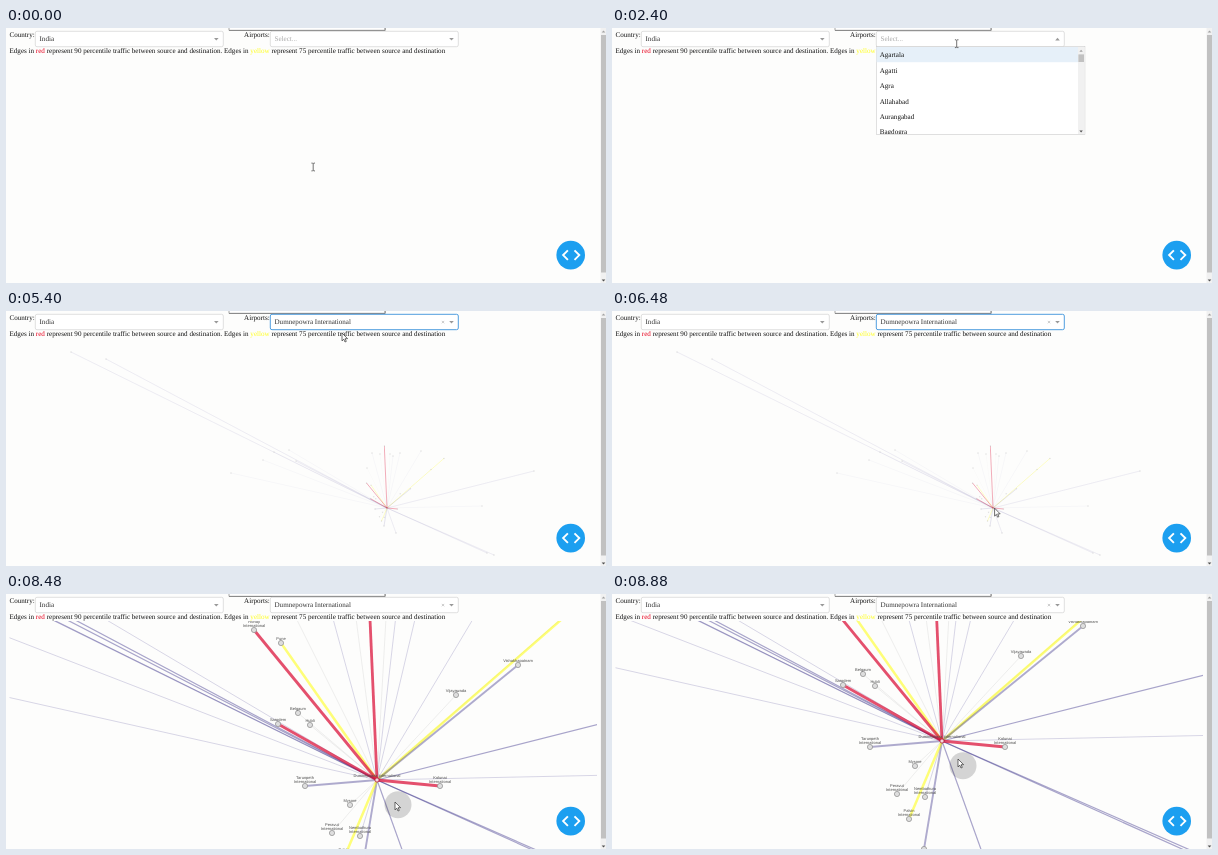
Animation of 600 by 255 pixels, one loop 9000 ms. Source, as an HTML page:

```html
<!DOCTYPE html>
<html lang="en">
<head>
<meta charset="utf-8">
<title>Airport traffic</title>
<style>
html, body { margin: 0; width: 100%; height: 100%; overflow: hidden; background: #fdfdfc; }
svg { display: block; width: 600px; height: 255px; }
text { font: 7.09px "Liberation Serif", "Times New Roman", serif; fill: #111; text-rendering: geometricPrecision; white-space: pre; }
#graph text { font: 4px "Liberation Sans", Arial, sans-serif; fill: #4a4a4a; text-anchor: middle; }
</style>
</head>
<body>
<svg id="stage" viewBox="0 0 600 255">
  <defs><clipPath id="view"><rect x="3.5" y="27" width="587.5" height="228"/></clipPath>
  <clipPath id="list"><rect x="264" y="18.5" width="209" height="87.6"/></clipPath></defs>
  <g clip-path="url(#view)"><g id="graph"><g id="edges"></g><g id="labels"></g></g><circle id="press" r="13.5" fill="#000" opacity=".16"/></g>

  <path d="M223 0V2.4H379V0" fill="#fff" stroke="#a5a5a5"/>
  <path d="M223 2.4H379.2V0" fill="none" stroke="#777" stroke-width=".7"/>
  <text x="3.5" y="9.3">Country:</text>
  <text x="238.1" y="9.4">Airports:</text>
  <text x="3.5" y="25.2">Edges in <tspan fill="#e8001c">red</tspan> represent 90 percentile traffic between source and destination. Edges in <tspan fill="#ffff1a">yellow</tspan> represent 75 percentile traffic between source and destination</text>

  <rect x="29.3" y="3.3" width="188" height="15.4" rx="1.7" fill="#fff" stroke="#ccc" stroke-width=".6"/>
  <text x="33.5" y="13.4" style="fill:#333">India</text>
  <path d="M208 9.9h4.6l-2.3 2.6z" fill="#999"/>

  <rect id="box" x="264.3" y="3.3" width="188" height="15.4" rx="1.7" fill="#fff"/>
  <text id="value" x="268.5" y="13.4"></text>
  <rect id="caret" y="7.4" width=".6" height="7.4" fill="#222"/>
  <path id="clear" d="M435.8 9.9l2.4 2.4m0-2.4l-2.4 2.4" stroke="#aaa" stroke-width=".6"/>
  <path id="arrow" fill="#999"/>
  <g id="menu">
    <rect id="menuBox" x="264.3" y="18.6" width="208.6" fill="#fff" stroke="#ccc" stroke-width=".6"/>
    <rect id="hover" x="264.6" y="19" height="15.2" fill="#e6f0f9"/>
    <g id="options" clip-path="url(#list)"></g>
    <g id="menuBar">
      <rect x="466" y="19" width="6.5" height="87" fill="#f1f1f1"/>
      <rect x="466.4" y="26.4" width="5.6" height="7.6" fill="#c1c1c1"/>
      <path d="M467.4 23.8h3.4l-1.7-2z" fill="#a3a3a3"/>
      <path d="M467.4 102.6h3.4l-1.7 2z" fill="#505050"/>
    </g>
  </g>

  <rect x="594.5" width="5.5" height="255" fill="#f1f1f1"/>
  <rect x="595" y="7" width="5" height="237.5" fill="#c1c1c1"/>
  <path d="M595.7 4.6h3.6l-1.8-2z" fill="#a3a3a3"/>
  <path d="M595.7 251.4h3.6l-1.8 2z" fill="#505050"/>
  <circle cx="564.7" cy="227.1" r="14.3" fill="#1c9ff0"/>
  <path d="M561.9 222.3l-4.8 4.8 4.8 4.8M568.5 222.3l4.8 4.8-4.8 4.8" fill="none" stroke="#fff" stroke-width="1.9"/>

  <g id="beam" fill="none" stroke="#444" stroke-width=".75"><path d="M-1.8-3.9H-.5L0-3.4.5-3.9H1.8M0-3.4V3.4M-1.8 3.9H-.5L0 3.4.5 3.9H1.8"/></g>
  <g id="hand"><path d="M0 0q.9 0 .9 1v2l2.3.6q.9.3.8 1.2L3.6 7.5H-.6L-2.6 4.4q.6-.7 1.7.4V1q0-1 .9-1z" fill="#fff" stroke="#222" stroke-width=".55"/></g>
  <g id="pointer"><path d="M0 0V7.9L1.8 6.2 3 9 4.3 8.4 3.1 5.7H5.6z" fill="#fff" stroke="#222" stroke-width=".65"/></g>
</svg>
<script>
const LOOP = 9000, HUB = 'Dumnepowra International';
const $ = id => document.getElementById(id);

function add(parent, tag, attrs, text) {
  const el = document.createElementNS('http://www.w3.org/2000/svg', tag);
  for (const k in attrs) el.setAttribute(k, attrs[k]);
  if (text) el.textContent = text;
  return parent.appendChild(el);
}
const show = (id, on) => $(id).setAttribute('display', on ? 'inline' : 'none');
const move = (id, x, y) => $(id).setAttribute('transform', `translate(${x} ${y})`);

// stroke, width, opacity
const STYLES = {
  red: ['#dc143c', 2.8, .74],
  yellow: ['#ffff00', 2.5, .52],
  thick: ['#2a2080', 1.9, .37],
  mid: ['#2a2080', 1.2, .4],
  thin: ['#2a2080', .7, .25],
  faint: ['#444444', .5, .17]
};
// offsets from the hub at full zoom
const NEAR = [
  [-67, -55, 'faint', 'Hubli'], [-79, -67, 'faint', 'Belgaum'],
  [-27, 25, 'faint', 'Mysore'], [-45, 53, 'faint', 'Peravut|International'],
  [79, -85, 'faint', 'Vijayawada'], [-17, 56, 'thin', 'Nembathura|International'],
  [-72, 6, 'thick', 'Tarunpeth|International'], [141, -115, 'thick', 'Vishakhapatnam'],
  [-96, -137, 'yellow', 'Pune'], [-33, 78, 'yellow', 'Palvin|International'],
  [-123, -150, 'red', 'Vikrantesh|Rohaji|International'],
  [-99, -56, 'red', 'Sarodem'], [63, 6, 'red', 'Kolunai|International']
];
// offsets from the hub before zooming
const FAR = [
  [-316, -156, 'mid'], [-281, -149, 'mid'], [-91, -47, 'mid'], [-113, -56, 'thin'],
  [-124, -48, 'thin'], [-156, -35, 'thin'], [-98, -58, 'thin'], [-20, -40, 'faint'],
  [-7, -54, 'faint'], [-15, -55, 'thin'], [3, -54, 'faint'], [6, -52, 'thin'],
  [13, -55, 'thin'], [34, -57, 'thin'], [44, -38.5, 'faint'], [57, -49.6, 'yellow'],
  [147, -37, 'mid'], [95, -2, 'thin'], [107, 47, 'mid'], [100, 45, 'mid'],
  [9, 25, 'mid'], [-3, 18, 'thick'], [-2.7, -62, 'red']
];

function buildGraph() {
  const g = $('edges');
  const nodes = FAR.map(([x, y, s]) => [x * 6, y * 6, s]).concat(NEAR);
  for (const [x2, y2, s] of nodes) {
    const [stroke, width, opacity] = STYLES[s];
    add(g, 'line', { x2, y2, stroke, 'stroke-width': width, opacity });
  }
  for (const [cx, cy, , name] of nodes) {
    add(g, 'circle', { cx, cy, r: 2.6, fill: '#dedede', stroke: '#8c8c8c', 'stroke-width': .7 });
    if (name) label(cx, cy, name.split('|'));
  }
  add(g, 'circle', { r: 2.1, fill: '#f4d6dc', stroke: '#b01335', 'stroke-width': .7 });
  label(0, 0, [HUB]);
}
function label(x, y, lines) {
  lines.forEach((s, i) => add($('labels'), 'text', { x, y: y - 3.1 - 4.2 * (lines.length - 1 - i) }, s));
}

const LISTS = {
  '': ['Agartala', 'Agatti', 'Agra', 'Allahabad', 'Aurangabad', 'Bagdogra'],
  d: ['Allahabad', 'Aurangabad', 'Bagdogra', 'Chandigarh', 'Dehradun', 'Dimapur'],
  du: ['Dehradun', HUB, 'Madurai'],
  dum: [HUB]
};
let listed;
function fillMenu(query) {
  if (query === listed) return;
  listed = query;
  const names = LISTS[query], full = names.length > 5;
  $('options').replaceChildren();
  names.forEach((s, i) => add($('options'), 'text', { x: 267.7, y: 29.3 + 15.4 * i }, s));
  $('menuBox').setAttribute('height', full ? 87.8 : 15.4 * names.length + .8);
  $('hover').setAttribute('width', full ? 201.4 : 208);
  show('menuBar', full);
}

const mix = (a, b, k) => a + (b - a) * k;
const ease = k => k * k * (3 - 2 * k);
const part = (n, from, count) => Math.min(1, Math.max(0, (n - from + 1) / count));

// piecewise path through [tick, x, y] points
function along(points, n) {
  let i = 0;
  while (i < points.length - 2 && n >= points[i + 1][0]) i++;
  const [a, ax, ay] = points[i], [b, bx, by] = points[i + 1];
  const k = Math.min(1, Math.max(0, (n - a) / (b - a)));
  return [mix(ax, bx, k), mix(ay, by, k)];
}
const DRAG = [[84, 398, 216], [85, 389, 208], [87, 352, 174], [89, 346, 165]];
const PAN = [[84, 0, 0], [85, -6, -5], [87, -32, -27], [88, -42, -37], [89, -47, -44]];

function cursor(n) {
  let kind = 'beam', pos;
  if (n < 16) {
    const k = ease(part(n, 6, 10));
    pos = [mix(307.2, 343.8, k), mix(139, 15.2, k)];
  } else if (n < 46) pos = [344.7, 15.7];
  else if (n < 47) pos = [342.5, 19];
  else if (n < 59) {
    kind = n < 52 ? 'hand' : 'pointer';
    pos = n < 48 ? [338, 21] : [336, 22];
  } else {
    kind = 'pointer';
    const k = ease(part(n, 59, 7)), j = part(n, 79, 3);
    pos = n < 79 ? [mix(336, 382.6, k), mix(22, 197.2, k)]
      : n < 84 ? [mix(382.6, 398, j), mix(197.2, 216, j)] : along(DRAG, n);
  }
  for (const c of ['beam', 'hand', 'pointer']) show(c, c === kind);
  move(kind, ...pos);
}

function zoomAt(n) {
  if (n < 68) return 1;
  return n < 75 ? mix(1, 1.82, part(n, 68, 3)) : 6;
}

function draw(t) {
  // the screen refreshes ten times a second
  const n = 2 * Math.floor(t / 200) + (t % 200 >= 80 ? 1 : 0);
  const open = n >= 18 && n < 52, chosen = n >= 52;
  const query = 'dum'.slice(0, n < 33 ? 0 : n < 35 ? 1 : n < 36 ? 2 : 3);

  $('value').textContent = chosen ? HUB : open && query || 'Select...';
  $('value').style.fill = chosen ? '#333' : open && query ? '#111' : '#aaa';
  $('caret').setAttribute('x', 268.4 + [0, 3.6, 7.1, 12.7][query.length]);
  show('caret', open && (n < 24 || n >= 30 && n < 42 || n >= 47));
  show('clear', chosen);
  $('arrow').setAttribute('d', open ? 'M443.2 12.4h4.6l-2.3-2.6z' : 'M443.2 9.9h4.6l-2.3 2.6z');
  const focus = chosen && n < 84;
  $('box').setAttribute('stroke', focus ? '#3d94dc' : '#ccc');
  $('box').setAttribute('stroke-width', focus ? .9 : .6);
  show('menu', open);
  if (open) fillMenu(query);

  const z = zoomAt(n), [px, py] = along(PAN, n);
  show('graph', n >= 54);
  show('labels', z > 1.5);
  $('graph').setAttribute('transform',
    `translate(${381.8 - .8 * z + px} ${198.2 - 1.2 * z + py}) scale(${z / 6})`);
  show('press', n >= 84);
  move('press', 398 + px, 215.7 + py);
  cursor(n);
}

buildGraph();
const start = performance.now();
function loop() {
  draw((performance.now() - start) % LOOP);
  requestAnimationFrame(loop);
}
loop();
</script>
</body>
</html>
```
